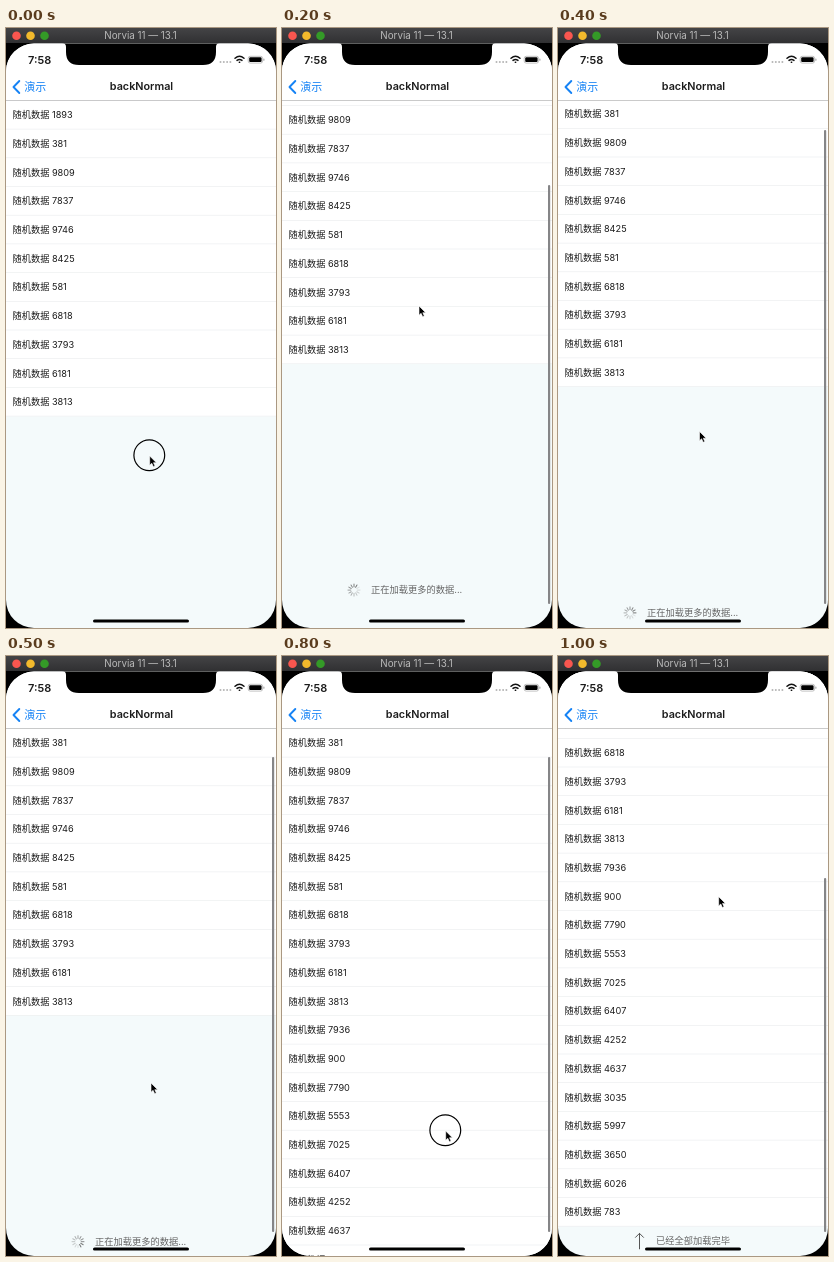
Write an HTML page that moves like this. It is 270 px wide and 600 px high and loops after 1.1 s.

```html
<!DOCTYPE html>
<html lang="zh-CN">
<head>
<meta charset="utf-8">
<title>backNormal</title>
<style>
html, body { margin: 0; width: 100%; height: 100%; overflow: hidden; background: #000; }
svg { display: block; width: 270px; height: 600px; }
text { font: 9.2px Inter, "Noto Sans CJK SC", "Noto Sans CJK", sans-serif; fill: #1c1c1c; }
.footer text { fill: #666; font-size: 9.25px; }
.line { fill: none; stroke-linecap: round; stroke-linejoin: round; }
</style>
</head>
<body>
<svg viewBox="0 0 270 600">
  <defs>
    <clipPath id="screen"><rect y="15.5" width="270" height="584.5" rx="28"/></clipPath>
    <linearGradient id="bar" x2="0" y2="1">
      <stop stop-color="#444446"/><stop offset="1" stop-color="#303032"/>
    </linearGradient>
  </defs>
  <rect width="270" height="600"/>
  <g clip-path="url(#screen)">
    <rect width="270" height="600" fill="#f4fafb"/>
    <g id="list">
      <rect id="sheet" y="72.7" width="270" fill="#fff"/>
    </g>
    <g id="loading" class="footer">
      <g id="spinner" stroke="#555" stroke-width="1" class="line"></g>
      <text x="89" y="3.3">正在加载更多的数据...</text>
    </g>
    <g id="done" class="footer">
      <path class="line" d="M81.5 8V-7.5M77.5-3.5l4-4 4 4" stroke="#555"/>
      <text x="98" y="3.3">已经全部加载完毕</text>
    </g>
    <rect id="thumb" x="266" width="2.2" rx="1.1" fill="#858587"/>
    <rect width="270" height="72.5" fill="#fff"/>
    <rect y="72" width="270" height=".8" fill="#bdbdbd"/>
    <path d="M56 15q4 0 4 4v5q0 13 13 13h124q13 0 13-13v-5q0-4 4-4z"/>
    <text x="22" y="36" style="font-size:11px;font-weight:600">7:58</text>
    <g fill="#b5b5b5">
      <circle cx="214.5" cy="34" r="1"/><circle cx="217.8" cy="34" r="1"/>
      <circle cx="221.1" cy="34" r="1"/><circle cx="224.4" cy="34" r="1"/>
    </g>
    <path class="line" stroke="#111" stroke-width="1.5" d="M229 30.3q4.5-4 9 0M231 32.4q2.5-2 5 0M233.3 34.3h.4"/>
    <rect x="242.2" y="28.3" width="14.4" height="6.8" rx="2" fill="#fff" stroke="#999" stroke-width=".6"/>
    <rect x="243.2" y="29.3" width="12.4" height="4.8" rx="1.1"/>
    <rect x="257.4" y="30.6" width="1" height="2.2" rx=".5" fill="#999"/>
    <path class="line" stroke="#1683f5" stroke-width="1.9" d="M13.3 53l-5.8 6 5.8 6"/>
    <text x="18.3" y="62.6" style="font-size:11px;fill:#1683f5">演示</text>
    <text x="135.5" y="62.3" text-anchor="middle" style="font-size:10.8px;font-weight:600">backNormal</text>
    <rect x="87" y="591.4" width="96" height="3.2" rx="1.6"/>
  </g>
  <rect width="270" height="15" fill="url(#bar)"/>
  <circle cx="10.5" cy="7.8" r="4.3" fill="#f9564f"/>
  <circle cx="24.5" cy="7.8" r="4.3" fill="#f2b92c"/>
  <circle cx="38.5" cy="7.8" r="4.3" fill="#349a27"/>
  <text x="134.5" y="11.4" text-anchor="middle" style="font-size:9.8px;fill:#b9b9b9">Norvia 11 — 13.1</text>
  <g id="pointer">
    <circle id="touch" cx="-.4" cy="-.8" r="15.4" fill="none" stroke="#000" stroke-width="1.2"/>
    <path d="M0 0v9.2l2.1-1.9 1.6 3.5 1.6-.7-1.5-3.4h2.9z" stroke="#fff" stroke-width=".6"/>
  </g>
</svg>
<script>
const $ = id => document.getElementById(id);
const ROW = 28.7, TOP = 72.7, STEP = 100, LOOP = 1100;
const values = [1893, 381, 9809, 7837, 9746, 8425, 581, 6818, 3793, 6181, 3813, 7936,
  900, 7790, 5553, 7025, 6407, 4252, 4637, 3035, 5997, 3650, 6026, 783];
const firstPage = 11;

// One entry per step: scroll offset, top of the scroll thumb, pointer x and y
const steps = [
  [0, 0, 143.7, 428], [58, 161, 138, 300], [52.3, 157, 137, 278], [34, 116, 138, 335],
  [29.5, 102, 141.5, 403.5], [28.7, 101, 145, 427], [28.7, 101, 149, 445],
  [28.7, 101, 157, 463], [28.7, 101, 163.7, 475], [245.5, 276, 160.7, 240.7],
  [191, 222, 160.7, 240.7]
];

function add(parent, tag, attrs) {
  const el = document.createElementNS('http://www.w3.org/2000/svg', tag);
  for (const key in attrs) el.setAttribute(key, attrs[key]);
  return parent.appendChild(el);
}

const rows = values.map((value, i) => {
  const row = add($('list'), 'g', { transform: `translate(0 ${TOP + i * ROW})` });
  add(row, 'text', { x: 6.6, y: 17.6 }).textContent = '随机数据 ' + value;
  add(row, 'rect', { y: ROW - 0.6, width: 270, height: 0.6, fill: '#e9eced' });
  return row;
});

for (let i = 0; i < 12; i++)
  add($('spinner'), 'path', { d: 'M0-3.2V-6', transform: `rotate(${i * 30})`, opacity: 0.15 + i * 0.06 });

const move = (id, x, y) => $(id).setAttribute('transform', `translate(${x} ${y})`);
const show = (el, on) => el.style.display = on ? '' : 'none';

function draw(now) {
  const n = Math.floor(now % LOOP / STEP);
  const [scroll, thumb, x, y] = steps[n];
  const loaded = n >= 6;
  const count = loaded ? values.length : firstPage;

  rows.forEach((row, i) => show(row, i < count));
  $('sheet').setAttribute('height', count * ROW);
  move('list', 0, -scroll);

  show($('loading'), n > 0 && !loaded);
  move('loading', 0, 614.4 - scroll);
  $('spinner').setAttribute('transform', `translate(72 0) rotate(${Math.floor(n * 1.2) * 30})`);
  show($('done'), loaded);
  move('done', 0, TOP + (count + 0.5) * ROW - scroll);

  show($('thumb'), n > 0);
  $('thumb').setAttribute('y', thumb);
  $('thumb').setAttribute('height', 576 - thumb);

  move('pointer', x, y);
  show($('touch'), n < 2 || n === 8);
}

function tick() {
  draw(performance.now());
  requestAnimationFrame(tick);
}
tick();
</script>
</body>
</html>
```
